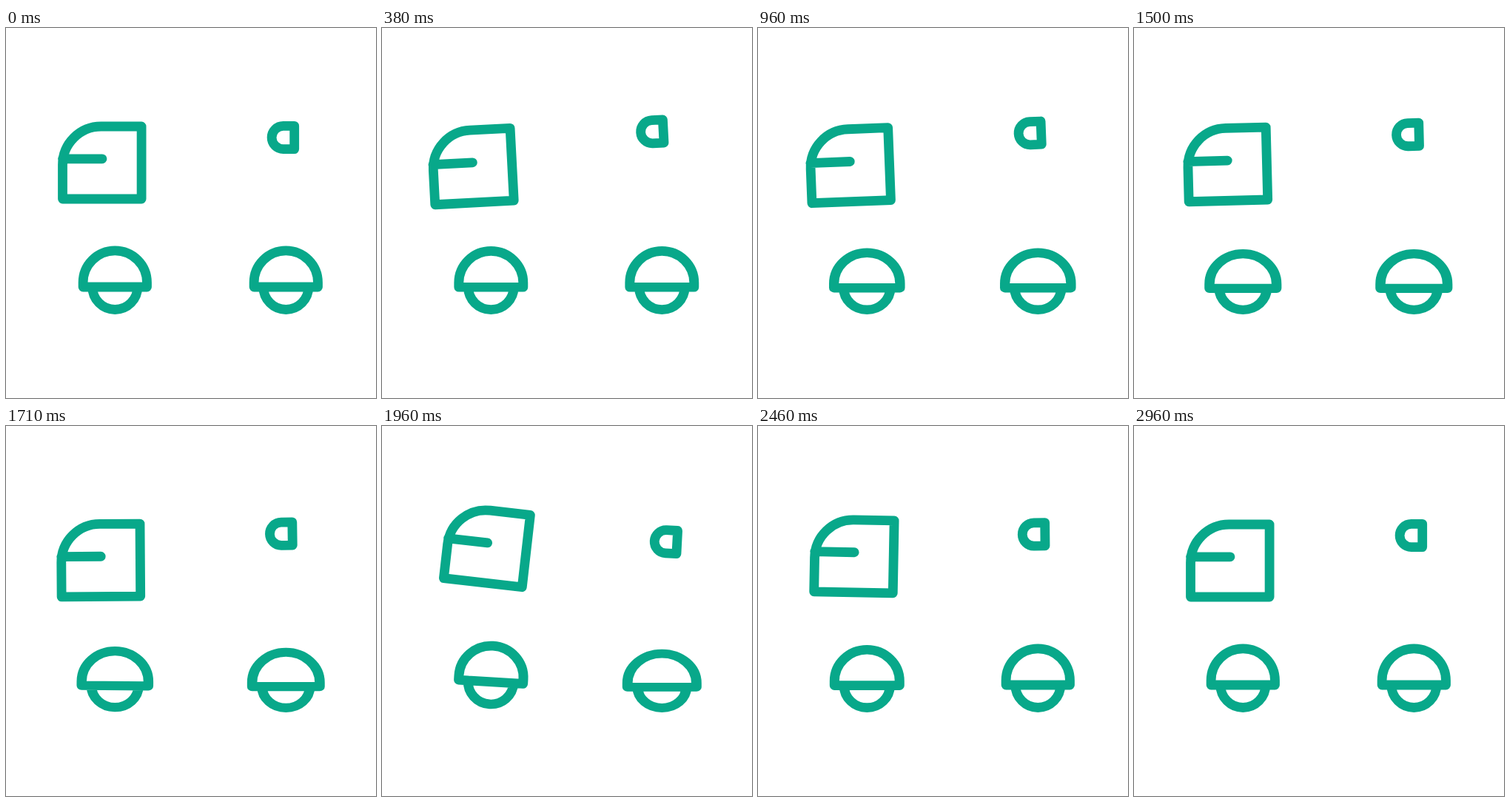
Write an HTML page that moves like this. It is 500 by 500 pixels and loops after 3000 ms.

```html
<!DOCTYPE html>
<html lang="en">
<head>
<meta charset="utf-8">
<title>Rocking truck</title>
<style>
  html, body { margin: 0; width: 100%; height: 100%; overflow: hidden; background: #fff; }
  svg { display: block; width: 100%; height: 100%; }
  svg * { fill: none; stroke: #08a88a; stroke-width: 12.8; stroke-linecap: round; stroke-linejoin: round; }
</style>
</head>
<body>
<svg viewBox="0 0 500 500">
  <defs>
    <path id="wheel" d="M-43.2 -37V-43A43.2 43.2 0 0 1 43.2 -43V-37ZM-30.5 -37A30.5 30.5 0 0 0 30.5 -37"/>
  </defs>
  <g id="body">
    <path id="cab" d="M183.1 133V231H76.5V185A52 52 0 0 1 128.8 133ZM76.5 176.8H130"/>
    <path d="M389.7 132.4V163.6H374.7A15.6 15.6 0 0 1 374.7 132.4Z"/>
  </g>
  <use id="front" href="#wheel"/>
  <use id="rear" href="#wheel"/>
</svg>
<script>
const LOOP = 3000, FPS = 24;
const BUMP = 1640, PEAK = 1930, LAND = 2200;

// Cosine easing through [time, value] points, holding the end values
function glide(t, ...points) {
  let value = points[0][1];
  for (let i = 1; i < points.length; i++) {
    const [t0] = points[i - 1], [t1, end] = points[i];
    const u = Math.min(1, Math.max(0, (t - t0) / (t1 - t0)));
    value += (end - value) * (1 - Math.cos(Math.PI * u)) / 2;
  }
  return value;
}

const move = (id, transform) => document.getElementById(id).setAttribute("transform", transform);

const wheel = (id, x, squash, kick = 0) => move(id,
  `translate(${x} ${387 - 4.7 * kick}) rotate(${3.6 * kick} 0 -40) scale(${1 + squash} ${1 - squash})`);

function draw(t) {
  // The body leans back, settles, then rocks over the bump; the cab hops on its own hinge
  const lean = glide(t, [0, 0], [360, -3], [1560, -1.45], [BUMP, -1.45], [PEAK, 3.1], [2260, -1.6], [2600, 0]);
  const hop = glide(t, [BUMP, 0], [PEAK, 3.5], [2960, 0]);
  move("body", `rotate(${lean} 222 325)`);
  move("cab", `rotate(${hop} 370 235)`);

  // Both wheels sag alike until the front one is kicked up
  const sag = [[0, 0], [1560, .05], [BUMP, .05]];
  const kick = glide(t, [BUMP, 0], [PEAK, 1], [LAND, 0]);
  wheel("front", 147.3, glide(t, ...sag, [PEAK, .009], [LAND, .035], [2720, 0]), kick);
  wheel("rear", 378.3, glide(t, ...sag, [1860, .085], [2430, 0]));
}

const start = performance.now();
function tick() {
  const t = (performance.now() - start) % LOOP;
  draw(Math.floor(t * FPS / 1000 + .1) * 1000 / FPS % LOOP);
  requestAnimationFrame(tick);
}
tick();
</script>
</body>
</html>
```
